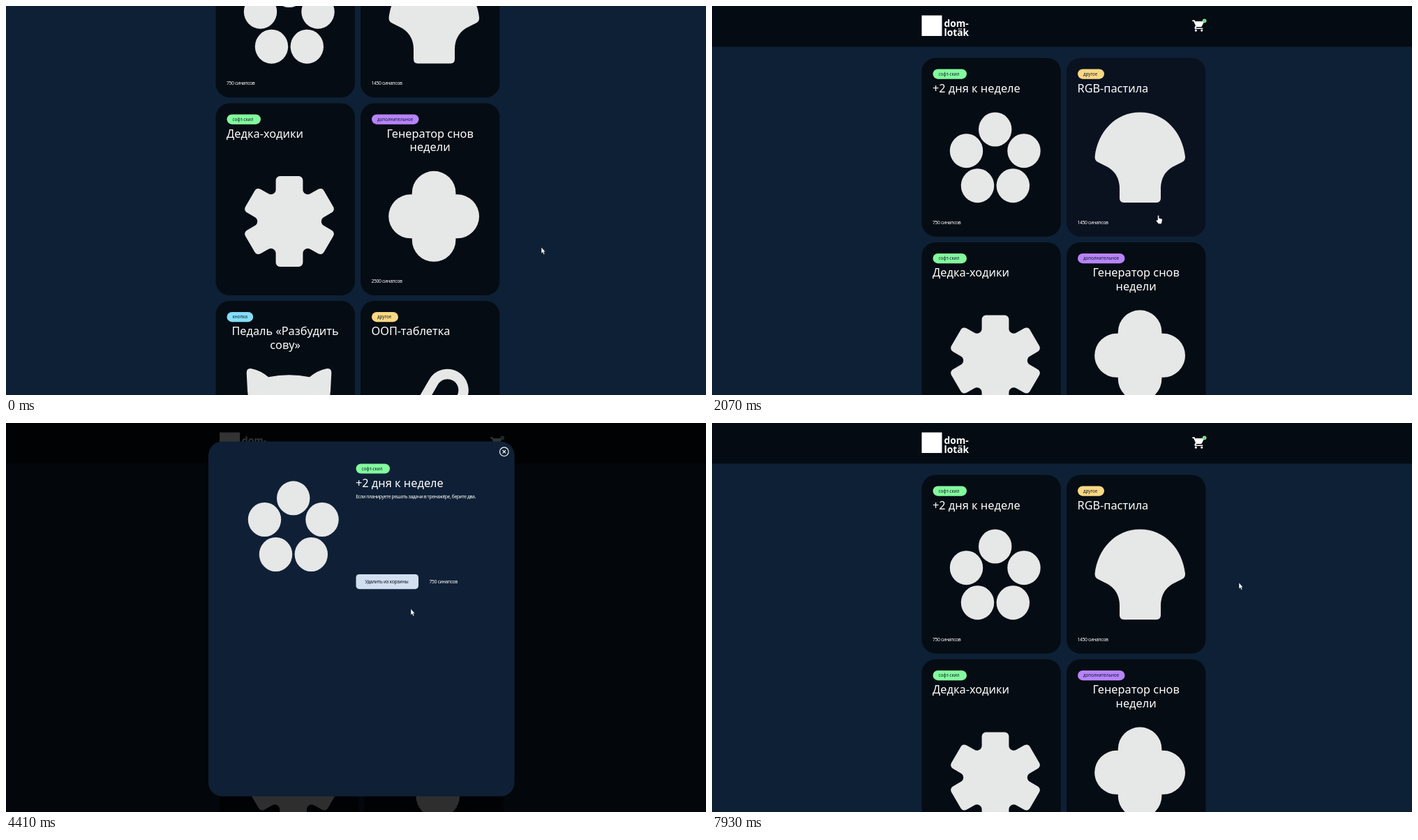
Recreate the animation shown at these times as an HTML page. Size 1003 by 558 pixels, loop 8000 ms.

```html
<!DOCTYPE html>
<html lang="ru">
<head>
<meta charset="utf-8">
<title>Магазин</title>
<style>
html, body { margin: 0; width: 100%; height: 100%; overflow: hidden; background: #0d2036; }
svg { display: block; width: 100vw; height: 100vh; }
text { font-family: "Noto Sans", "Open Sans", sans-serif; fill: #fff; }
.title { font-size: 16.3px; font-weight: 500; }
.mid { text-anchor: middle; }
.small { font-size: 6.8px; letter-spacing: -.36px; }
.note { font-size: 6.8px; letter-spacing: -.42px; }
.btn { font-size: 6.8px; letter-spacing: -.3px; fill: #0b1622; }
.tag { font-size: 6.2px; fill: #0b1a2a; }
.brand { font-size: 13.8px; font-weight: 600; }
.count { font-size: 3.6px; fill: #06301a; text-anchor: middle; }
.shape { fill: #e6e7e7; }
</style>
</head>
<body>
<svg id="stage" viewBox="0 0 1003 558"></svg>
<script>
const LOOP = 8000;
const CARD = '#050c13', CARD_HOVER = '#0a1220', PANEL = '#0f2036';
const GREEN = '#83fa9d', YELLOW = '#fad883', PURPLE = '#b783fa', BLUE = '#83ddfa';

const text = (x, y, cls, str) => `<text x="${x}" y="${y}" class="${cls}">${str}</text>`;
const rect = (x, y, w, h, r, fill, extra = '') =>
  `<rect x="${x}" y="${y}" width="${w}" height="${h}" rx="${r}" fill="${fill}" ${extra}/>`;
const tag = (x, y, w, fill, label) =>
  rect(x, y, w, 14.2, 7.1, fill) + text(x + 8, y + 9.1, 'tag', label);

// Closed polygon with each corner [x, y, radius] rounded by an arc.
function roundPoly(points) {
  const n = points.length;
  const parts = points.map(([x, y, r], i) => {
    const a = points[(i + n - 1) % n], b = points[(i + 1) % n];
    const ua = Math.atan2(a[1] - y, a[0] - x), ub = Math.atan2(b[1] - y, b[0] - x);
    const turn = Math.sin(ub - ua);
    const angle = Math.acos(Math.cos(ub - ua));
    const d = r / Math.tan(angle / 2);
    const at = u => (x + d * Math.cos(u)).toFixed(2) + ' ' + (y + d * Math.sin(u)).toFixed(2);
    return `${at(ua)}A${r} ${r} 0 0 ${turn < 0 ? 1 : 0} ${at(ub)}`;
  });
  return 'M' + parts.join('L') + 'Z';
}

function gear(cx, cy) {
  const half = 19.4, len = 65, points = [];
  for (let k = 0; k < 6; k++) {
    const c = Math.cos(k * Math.PI / 3), s = Math.sin(k * Math.PI / 3);
    const corners = [[-half, -len, 6], [half, -len, 6], [half, -half * Math.sqrt(3), 7]];
    for (const [x, y, r] of corners) points.push([cx + x * c - y * s, cy + x * s + y * c, r]);
  }
  return `<path class="shape" d="${roundPoly(points)}"/>`;
}

const flower = [[405.7, 177], [364.5, 207.7], [447, 207.7], [380.5, 257.7], [431.3, 257.7]]
  .map(([x, y]) => `<ellipse class="shape" cx="${x}" cy="${y}" rx="23.7" ry="24.5"/>`).join('');

const fan = `<path class="shape" d="M613.3 152.5C649 152.5 674 181 678 216Q678.3 221.5 674 223.8
  L664.5 228.4Q643 238 643 262V275.5Q643 282 637 282H590Q584 282 584 275.5V262Q584 238 562 228.4
  L552.6 223.8Q548.3 221.5 548.6 216C552.6 181 577.6 152.5 613.3 152.5Z"/>`;

const clover = `<g class="shape">
  <rect x="548.2" y="469.8" width="129.8" height="63" rx="31.5"/>
  <rect x="581.8" y="436.3" width="62.6" height="130" rx="31.3"/></g>`;

const cat = `<path class="shape" d="M349 780L346 751L344.7 726Q344.6 718.4 352 719.8Q365 722.5 376 731.8
  Q405.5 725.5 435 731.8Q446 722.5 459 719.8Q466.4 718.4 466.3 726L465 751L462 780Z"/>`;

const capsule = `<rect x="609.5" y="727.5" width="46" height="120" rx="23" fill="none"
  stroke="#e6e7e7" stroke-width="14.4" transform="rotate(30 632.5 750.5)"/>`;

function card({ id, x, y, h, label, tagW, color, title, price, shape }) {
  const left = x + 16;
  const head = title.length > 1
    ? title.map((line, i) => text(x + 99.6, y + 49.2 + i * 19.3, 'title mid', line)).join('')
    : text(left - .5, y + 49.2, 'title', title[0]);
  return rect(x, y, 199.4, h, 20, CARD, id ? `id="${id}"` : '') + tag(left, y + 16, tagW, color, label) +
    head + shape + (price ? text(left - .5, y + h - 18, 'small', price + ' синапсов') : '');
}

const L = 300.5, R = 508;
const cards = [
  { id: 'cardA', x: L, y: 74.5, h: 256.2, label: 'софт-скил', tagW: 48.5, color: GREEN,
    title: ['+2 дня к неделе'], price: 750, shape: flower },
  { id: 'cardB', x: R, y: 74.5, h: 256.2, label: 'другое', tagW: 38, color: YELLOW,
    title: ['RGB-пастила'], price: 1450, shape: fan },
  { x: L, y: 339, h: 275.5, label: 'софт-скил', tagW: 48.5, color: GREEN,
    title: ['Дедка-ходики'], shape: gear(406, 508.5) },
  { x: R, y: 339, h: 275.5, label: 'дополнительное', tagW: 67.5, color: PURPLE,
    title: ['Генератор снов', 'недели'], price: 2500, shape: clover },
  { x: L, y: 622.5, h: 275.5, label: 'кнопка', tagW: 37.7, color: BLUE,
    title: ['Педаль «Разбудить', 'сову»'], shape: cat },
  { x: R, y: 622.5, h: 275.5, label: 'другое', tagW: 38, color: YELLOW,
    title: ['ООП-таблетка'], shape: capsule }
].map(card).join('');

const cart = `<g fill="#fff">
  <path d="M688.3 20.3H691.6L692.4 22H705.5L701.8 29.2Q701.3 30 700.3 30H694.2L693.4 31.5H703.3V33.1H693
    Q690.6 32.6 691.7 30.2L692.9 28.1L690 22H688.3Z"/>
  <circle cx="693.3" cy="35.1" r="1.6"/><circle cx="701.7" cy="35.1" r="1.6"/></g>
  <circle cx="705.6" cy="21.2" r="2.8" fill="${GREEN}"/>` + text(705.6, 22.5, 'count', '0');

const header = rect(-10, 0, 1023, 58.3, 0, '#040b12') + rect(300.5, 13.5, 29, 29.5, 0, '#fff') +
  text(332.5, 30, 'brand', 'dom-') + text(332.5, 42.6, 'brand', 'lotäk') + cart;

const modal = rect(0, 0, 1003, 558, 0, '#000', 'opacity=".8"') + rect(290, 26.5, 438.5, 509, 20, PANEL) +
  `<g transform="translate(6 -69.2)">${flower}</g>` + tag(501.5, 58.4, 48.5, GREEN, 'софт-скил') +
  text(501, 92, 'title', '+2 дня к неделе') +
  text(501.2, 108.2, 'note', 'Если планируете решать задачи в тренажёре, берите два.') +
  rect(501.5, 217, 58.5, 21.2, 4.6, '#fff', 'id="button"') +
  '<text id="label" class="btn" x="514.4" y="230"></text>' +
  '<text id="price" class="small" y="230">750 синапсов</text>' +
  `<g fill="none" stroke="#fff" stroke-width="1.1"><circle cx="713.8" cy="41.2" r="6.3"/>
   <path d="M711.6 39l4.4 4.4m0-4.4l-4.4 4.4"/></g>`;

const $ = id => document.getElementById(id);
$('stage').innerHTML = rect(0, 0, 1003, 558, 0, '#0d2036') +
  `<g id="page">${cards}${header}</g><g id="modal">${modal}</g>
  <g fill="#fff" stroke="#0a0f16" stroke-width=".5" stroke-linejoin="round">
  <path id="arrow" d="M0 0V9L2 7.2L3.4 10.4L4.9 9.7L3.6 6.7H6Z"/>
  <path id="hand" d="M2.6 7.2V1.3a1 1 0 0 1 2 0V4.3L8.2 5.2Q9.3 5.6 9.2 6.8L8.7 9.8L7.9 12.6H3.8L.6 8.7
    Q0 7.5 1.1 7.2Q1.8 7 2.6 7.2Z"/></g>`;

// Each track is [time, ...value]; a value holds until the next entry.
const scrollTrack = [[0, 199.5], [560, 66.5], [840, 0]];
const hoverTrack = [[0, ''], [1950, 'cardB'], [2340, 'cardA'], [2880, '']];
const buttonTrack = [[0, '#fff'], [3580, '#b4c9e5'], [3730, '#608cc8'], [4410, '#d2dff0'], [4530, '#fff'],
  [5220, '#b4c9e5'], [5340, '#608cc8'], [6420, '#8fafd9'], [6570, '#fff']];
const cursorTrack = [
  [0, 767, 346, 0], [1270, 766.5, 347, 0], [1550, 752, 342, 0], [1675, 730, 333, 0], [1800, 701, 322, 0],
  [1950, 667, 311, 1], [2070, 636, 300, 1], [2190, 492, 246, 1], [2340, 447, 227, 1], [2460, 427, 215, 1],
  [2600, 426.5, 215.5, 1], [2880, 429, 215.5, 0], [3280, 432.5, 219, 0], [3430, 483.5, 226.5, 0],
  [3580, 531, 228, 1], [4260, 546, 237, 1], [4410, 580, 266.5, 0], [4530, 600.5, 269.5, 0],
  [4930, 599.5, 269, 0], [5080, 558.5, 233, 1], [5220, 557, 232, 1], [6420, 573, 248, 0],
  [6570, 634.5, 281, 0], [6960, 691.5, 261, 0], [7110, 739.5, 241, 0], [7260, 753, 231, 0], [7380, 755, 229, 0]
];
const at = (track, t) => track.findLast(step => step[0] <= t).slice(1);

function draw(t) {
  const open = t >= 2880 && t < 7930;
  const added = t >= 4130 && t < 6300;
  const [hover] = at(hoverTrack, t);
  const [x, y, hand] = at(cursorTrack, t);

  $('page').setAttribute('transform', `translate(${open ? 5.6 : 0} ${-at(scrollTrack, t)[0]})`);
  for (const id of ['cardA', 'cardB']) $(id).setAttribute('fill', id === hover ? CARD_HOVER : CARD);

  $('modal').style.display = open ? '' : 'none';
  $('button').setAttribute('width', added ? 89.5 : 58.5);
  $('button').setAttribute('fill', at(buttonTrack, t)[0]);
  $('label').textContent = added ? 'Удалить из корзины' : 'В корзину';
  $('price').setAttribute('x', added ? 606.5 : 575.5);

  $('arrow').style.display = hand ? 'none' : '';
  $('hand').style.display = hand ? '' : 'none';
  $(hand ? 'hand' : 'arrow').setAttribute('transform', `translate(${x} ${y})`);
}

const start = performance.now();
function tick() {
  draw((performance.now() - start) % LOOP);
  requestAnimationFrame(tick);
}
tick();
</script>
</body>
</html>
```
